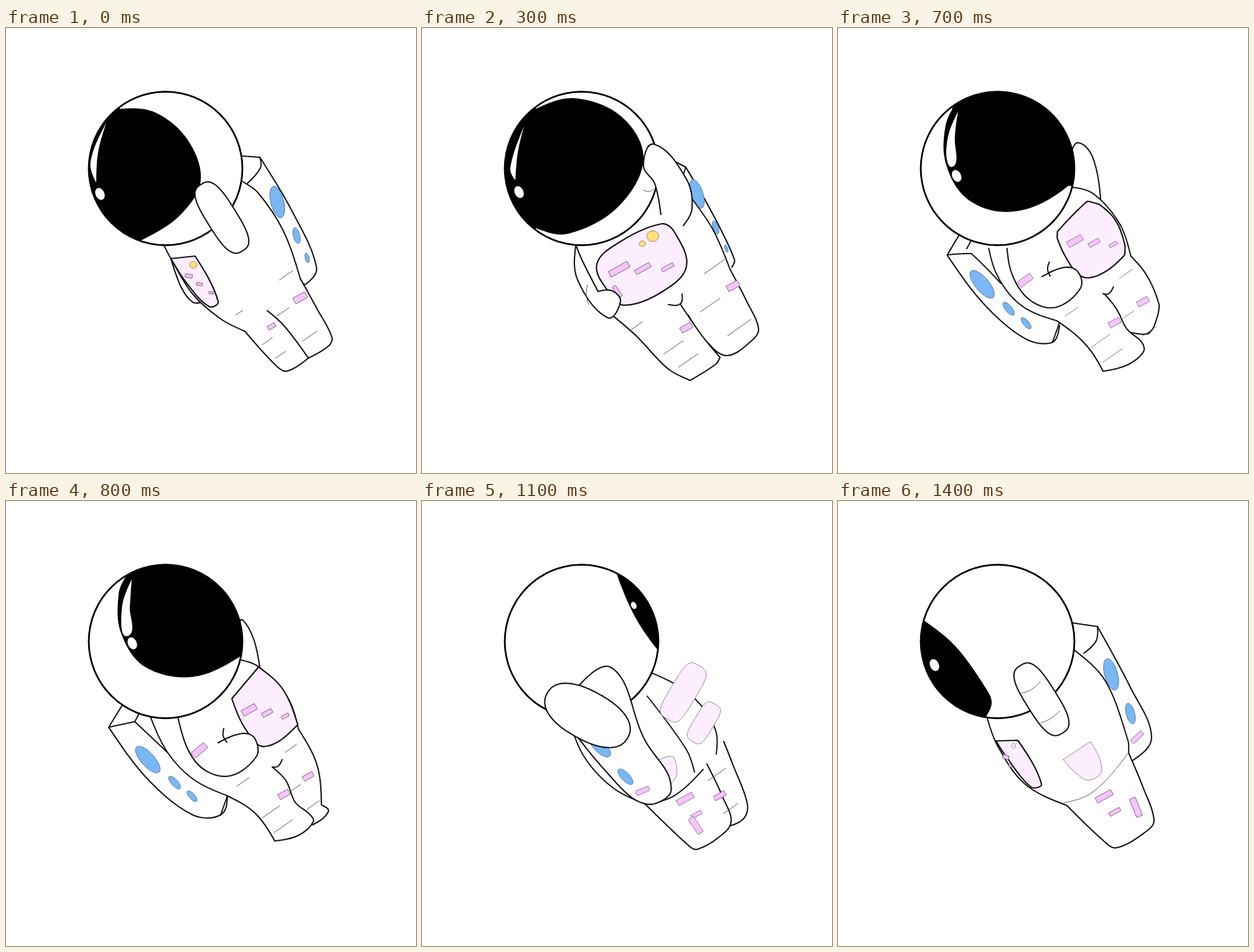
Recreate the animation shown at these times as an HTML page. Size 659 by 716 pixels, loop 1.5 s.

```html
<!DOCTYPE html>
<html lang="en">
<head>
<meta charset="utf-8">
<title>Turning astronaut</title>
<style>
html, body { margin: 0; width: 100%; height: 100%; overflow: hidden; background: #fff; }
svg { display: block; width: 100%; height: 100%; }
path { stroke-linejoin: round; stroke-linecap: round; }
.skin, .glint { fill: #fff; }
.limb { fill: #fff; stroke: #111; stroke-width: 2.1; }
.edge { fill: none; stroke: #111; stroke-width: 2; }
.fold { fill: none; stroke: #555; stroke-width: 1; }
.panel { fill: #fcedff; stroke: #111; stroke-width: 2.2; }
.patch { fill: #fcedff; stroke: #8d858f; stroke-width: 1; }
.bar { fill: #f4c6fc; stroke: #7c5c84; stroke-width: 1; }
.blue { fill: #79b7f5; stroke: #55708a; stroke-width: 1; }
.sun { fill: #ffe079; stroke: #8a7a58; stroke-width: 1; }
.visor { fill: #000; }
.visor, .glint { clip-path: url(#helmet); }
.rim { fill: none; stroke: #000; stroke-width: 2.8; }
</style>
</head>
<body>
<svg viewBox="0 0 659 716">
  <defs><clipPath id="helmet"><circle cx="256.5" cy="226" r="123.5"/></clipPath></defs>
  <g id="figure"></g>
</svg>
<script>
const STEP = 100, STEPS = 15, SAMPLES = 120;
const HEAD = { x: 256.5, y: 226, r: 123.5 };
const poses = [];
let parts;

const range = (n, f) => Array.from({ length: n }, (_, i) => f(i));
const xy = p => p.x.toFixed(1) + ' ' + p.y.toFixed(1);
const polygon = pts => 'M' + pts.map(xy).join('L') + 'Z';

// "x,y" points joined by a smooth curve; a star marks a corner
function curve(text, closed) {
  const p = text.split(' ').map(s => {
    const [x, y] = s.split(',').map(parseFloat);
    return { x, y, corner: s.endsWith('*') };
  });
  const n = p.length;
  if (!closed) p[0].corner = p[n - 1].corner = true;
  const handle = (i, reach) => {
    if (p[i].corner) return null;
    const a = p[(i + n - 1) % n], b = p[(i + 1) % n];
    const k = reach / 3 / Math.hypot(b.x - a.x, b.y - a.y);
    return { x: p[i].x + (b.x - a.x) * k, y: p[i].y + (b.y - a.y) * k };
  };
  const mid = (a, b) => ({ x: (a.x + b.x) / 2, y: (a.y + b.y) / 2 });
  let d = 'M' + xy(p[0]);
  for (let i = 0; i < (closed ? n : n - 1); i++) {
    const j = (i + 1) % n, a = p[i], b = p[j];
    const len = Math.hypot(b.x - a.x, b.y - a.y);
    const h = handle(i, len), g = handle(j, -len);
    d += h || g ? `C${xy(h || mid(a, g))} ${xy(g || mid(b, h))} ${xy(b)}` : 'L' + xy(b);
  }
  return closed ? d + 'Z' : d;
}

const turned = (cx, cy, deg) => {
  const c = Math.cos(deg * Math.PI / 180), s = Math.sin(deg * Math.PI / 180);
  return (u, v) => ({ x: cx + u * c - v * s, y: cy + u * s + v * c });
};

// superellipse: power 2 is an ellipse, higher is boxier
function blob(cx, cy, rx, ry, deg = 0, power = 2) {
  const at = turned(cx, cy, deg);
  const bend = v => Math.sign(v) * Math.abs(v) ** (2 / power);
  return polygon(range(64, i => {
    const a = i * Math.PI / 32;
    return at(rx * bend(Math.cos(a)), ry * bend(Math.sin(a)));
  }));
}

function rect(cx, cy, w, h, deg) {
  const at = turned(cx, cy, deg);
  return polygon([at(-w / 2, -h / 2), at(w / 2, -h / 2), at(w / 2, h / 2), at(-w / 2, h / 2)]);
}

const add = (name, style, d) => parts.push({ name, style, d });
const pose = step => poses.push({ step, parts: parts = [] });
const limb = (name, text) => add(name, 'limb', curve(text));
const edge = (name, text, style = 'edge') => add(name, style, curve(text));
const panel = text => add('panel', 'panel', curve(text, true));
const patch = text => add('patch', 'patch', curve(text, true));
const capsule = (name, style, ...box) => add(name, style, blob(...box));

const folds = (...list) => list.forEach(([x, y, len], i) => {
  const at = turned(x, y, -35);
  add('fold' + i, 'fold', `M${xy(at(-len / 2, 0))}L${xy(at(len / 2, 0))}`);
});
const blues = (deg, ...list) => list.forEach(([x, y, r], i) =>
  add('blue' + i, 'blue', blob(x, y, r * .4, r, deg)));
const suns = (...list) => list.forEach(([x, y, r], i) => add('sun' + i, 'sun', blob(x, y, r, r * .9)));
const bars = (name, ratio, ...list) => list.forEach(([x, y, w, deg = -29], i) =>
  add(name + i, 'bar', rect(x, y, w, w * ratio, deg)));

function body(left, right) {
  const pin = s => s.replace(' ', '* ') + '*';
  add('trunk', 'skin', curve(pin(left) + ' ' + pin(right), true));
  edge('left', left);
  edge('right', right);
}

function head(inside) {
  const ball = blob(HEAD.x, HEAD.y, HEAD.r, HEAD.r);
  add('ball', 'skin', ball);
  inside();
  add('rim', 'rim', ball);
}

// Only the inner edge is given; the rest runs clockwise outside the helmet
function visor(text, name = 'visor', dx = 0) {
  const angle = s => {
    const [x, y] = s.split(',').map(parseFloat);
    return Math.atan2(y - HEAD.y, x - HEAD.x);
  };
  const edgePts = text.split(' ');
  const from = angle(edgePts.at(-1));
  const span = (angle(edgePts[0]) - from + 2 * Math.PI) % (2 * Math.PI);
  const arc = range(7, i => {
    const a = from + span * i / 6;
    return `${HEAD.x + 175 * Math.cos(a)},${HEAD.y + 175 * Math.sin(a)}`;
  });
  edgePts[0] += '*';
  edgePts.push(edgePts.pop() + '*');
  const all = [...edgePts, ...arc].map(s => {
    const [x, y] = s.split(',');
    return `${+x + dx},${y}`;
  });
  add(name, 'visor', curve(all.join(' '), true));
}
const glint = text => add('glint', 'glint', curve(text, true));
const dot = (x, y, r = 10, name = 'dot') => add(name, 'glint', blob(x, y, r * .7, r, -25));

const rightVisor = '382,248 350,258* 300,188 264,102';
const leftVisor = '133,230 170,263 202,303 208,335';

// facing left
pose(0);
limb('packR', '380,206 408,208* 460,295 499,385 482,412 473,404');
edge('crease', '408,208 409,225 388,250');
blues(-14, [436, 280, 26], [467, 334, 13], [484, 370, 8]);
limb('arm2', '265,371 282,418 300,441 316,441');
limb('legR', '486,531 518,512 524,498 500,452 473,403');
limb('legL', '384,488 436,545 452,552 486,531* 445,477 410,447');
body('254,350 265,371 300,428 345,468 384,488', '473,403 445,325 405,265 380,247');
panel('265,371* 304,367* 341,440 326,448 290,410');
suns([301, 381, 6]);
bars('cell', .5, [294, 399, 11, 10], [311, 412, 9, 10], [330, 426, 7, 10]);
bars('leg', .5, [473, 434, 21], [427, 480, 13]);
folds([450, 398, 26], [445, 457, 24], [488, 496, 28], [375, 458, 14], [420, 504, 20], [441, 526, 20]);
head(() => {
  visor('183,130 240,136 292,180 313,245 280,301 217,342');
  glint('161,153* 136,215 145,249* 148,200');
  dot(151, 267);
});
capsule('arm1', 'limb', 347, 305, 63, 24, 58, 3);

// front, turned a little left
pose(3);
limb('packR', '403,213 424,224* 465,295 502,372 498,385');
edge('crease', '424,224 420,236');
blues(-18, [442, 267, 24], [472, 321, 11], [489, 355, 6]);
limb('legR', '428,462 458,505 490,527 530,503 541,484 522,440 495,388');
limb('legL', '307,463 345,496 395,548 431,567* 472,541 479,530* 450,495 415,444');
body('247,350 255,400 285,445 307,463', '495,388 468,325 434,275');
edge('crotch', '396,445 415,444 418,428');
panel('281,380 320,343 385,315 405,327 425,384 385,425 325,446 300,425');
suns([371, 335, 9.5], [354, 347, 5]);
bars('cell', .3, [317, 388, 34], [355, 387, 26], [395, 385, 20], [314, 424, 20, 55]);
bars('leg', .5, [500, 415, 20], [425, 482, 19]);
folds([470, 384, 40], [463, 446, 38], [510, 482, 46], [344, 480, 26], [404, 514, 38], [428, 535, 38]);
limb('arm2', '247,350 250,405 298,466 319,440 306,423 283,424* 258,375 248,351');
edge('crook', '266,413 264,430 268,445', 'fold');
head(() => {
  visor('183,130 245,113 320,142 356,210 315,288 235,331 183,322');
  glint('164,158* 142,225 150,245* 154,200');
  dot(156, 264);
});
limb('arm1', '384,300 374,250 356,222 373,187 425,243 434,290 420,318');
edge('wrist', '356,261 365,263 372,259', 'fold');

// front, turned a little right
pose(5);
limb('arm1', '393,258 390,229 378,195 407,169 439,198 452,310');
edge('wrist', '395,223 412,217 430,219', 'fold');
limb('pack', '210,343 196,368* 265,455 338,509 356,490');
edge('seam', '196,367 230,380 266,423');
blues(-36, [239, 405, 29], [281, 449, 13], [309, 475, 12]);
limb('legR', '430,429 460,473 497,511 530,490 544,468* 512,400 472,367');
limb('legL', '345,465 378,506 400,535 414,563* 468,544 492,520 488,504 460,483 430,429');
body('263,370 262,405 290,450 345,465', '472,367 450,308 415,264 376,258');
edge('crotch', '421,426 430,429 440,418');
panel('323,356* 365,317 413,291* 445,318 456,362* 415,401 362,417 338,388');
suns([401, 314, 9], [389, 329, 5]);
bars('cell', .32, [361, 356, 29], [395, 355, 22], [429, 353, 16], [366, 396, 23, 55]);
bars('leg', .45, [499, 435, 24], [440, 478, 22]);
folds([473, 390, 32], [470, 460, 20], [515, 485, 36], [365, 465, 30], [413, 511, 44], [433, 534, 42]);
limb('arm2', '263,370 262,405 290,450 328,464 365,430 345,407 302,422');
edge('thumb', '319,398 313,408 313,421');
edge('palm', '333,414 331,430 355,441', 'fold');
bars('sleeve', .5, [281, 416, 22]);
head(() => {
  visor('378,212 330,287 240,321 176,288 150,220 163,155 193,123');
  glint('175,150* 152,205 158,236 164,230 166,180');
  dot(166, 256);
});

// facing right
pose(8);
limb('arm1', '372,235 374,200 380,191 398,222 408,268');
limb('pack', '186,330 165,364* 230,450 300,505 345,505 356,474');
edge('seam', '165,364 207,355* 260,405');
edge('flap', '207,355 214,342');
edge('base', '356,474 345,505');
blues(-42, [228, 416, 27], [271, 453, 13], [299, 475, 11]);
limb('legR', '493,521 518,500 507,489* 500,425 470,367');
limb('legL', '355,474 400,502 432,547* 470,538 494,516 488,504 465,485 450,450 428,428');
body('232,347 260,405 300,447 355,474', '470,367 452,315 408,268 375,255');
edge('crotch', '428,428 437,427 444,416');
panel('363,318* 406,267* 445,303 469,360* 415,395 385,367');
bars('cell', .42, [391, 336, 24], [420, 341, 17], [449, 346, 12]);
bars('leg', .5, [486, 443, 17], [447, 472, 18]);
folds([458, 398, 22], [465, 462, 20], [494, 489, 24], [381, 452, 24], [426, 500, 34], [446, 523, 36]);
limb('arm2', '276,347 305,420 355,443 402,412 400,382 380,374 341,389');
edge('thumb', '350,366 349,378 355,388');
bars('sleeve', .42, [311, 401, 26, -40]);
head(() => {
  visor('380,248 300,283 222,266 184,210 181,150 192,122');
  glint('202,126* 186,175 196,217 199,170');
  dot(203, 229);
});

// back, turned right
pose(10);
add('pack', 'limb', curve('186,330 179,370* 250,450 325,514 363,497 300,420 256,300', true));
edge('seam', '179,370 205,373 228,362');
blues(-48, [243, 416, 26], [292, 467, 18]);
bars('tail', .33, [323, 490, 24]);
limb('legL', '355,485 425,552 441,560 480,538 503,514 490,475 467,417');
body('228,347 250,405 300,460 355,485', '467,417 474,375 440,303 381,252');
edge('belt', '355,485 410,469 468,415', 'fold');
panel('395,300* 410,274* 450,322 463,364 425,342');
suns([407, 307, 3.5], [417, 301, 2]);
bars('cell', .8, [431, 299, 9], [441, 310, 5]);
patch('357,419* 415,405* 416,436 390,454 366,438');
bars('tag', .35, [431, 472, 28], [449, 497, 18], [431, 527, 28, 50]);
limb('arm2', '317,334 345,388 395,415 440,375 415,353 404,364 414,363');
edge('cuff', '347,310 375,332 402,364');
head(() => {
  visor(rightVisor);
  visor(leftVisor, 'visor2', -110);
  glint('274,106* 285,147 298,153* 283,107*');
  dot(297, 168, 6);
});

// back, turned left
pose(13);
limb('legR', '485,525 516,512 523,488 500,425 485,387');
limb('legL', '363,490 439,563* 470,548 485,525 470,480 440,436');
body('262,390 300,447 363,490', '485,387 440,330 332,320');
edge('belt', '363,490 390,488 420,465');
patch('332,443* 380,417* 391,465 355,472');
bars('tag', .33, [407, 494, 28], [425, 519, 18], [458, 512, 31, 66]);
bars('leg', .42, [479, 474, 19]);
folds([474, 440, 34], [496, 495, 28]);
head(() => {
  visor(rightVisor, 'visor', 130);
  visor(leftVisor, 'visor2');
  dot(427, 168, 6);
  dot(155, 263, 10, 'dot2');
});
add('pack', 'limb', curve('330,320* 390,412 430,441 465,415 491,365 445,260 404,206 380,222', true));
edge('seam', '330,320 362,314* 390,265 415,215');
edge('side', '362,314 425,400 438,436');
capsule('pane0', 'patch', 420, 308, 50, 21, -59, 4);
capsule('pane1', 'patch', 453, 357, 35, 16, -59, 4);
blues(-33, [369, 348, 21], [397, 397, 13]);
bars('tail', .35, [418, 419, 20, -5]);
capsule('arm1', 'limb', 266, 345, 74, 39, 29, 2.3);

// facing away to the left
pose(14);
limb('packR', '376,196 417,202* 470,300 504,380 473,418');
edge('crease', '417,202 415,225 395,245');
blues(-15, [439, 279, 26], [470, 342, 17]);
bars('tail', .35, [481, 380, 22, -45]);
limb('legL', '368,490 425,545 447,558 495,532 508,514 490,460 467,405');
body('240,350 257,395 300,455 368,490', '467,405 466,385 430,290 380,240');
edge('belt', '362,486 410,468 467,405', 'fold');
panel('254,386* 289,385* 327,455 310,460 268,408');
bars('cell', .7, [270, 412, 9, 20], [277, 426, 5, 20]);
capsule('ring', 'patch', 282, 394, 3, 4);
patch('362,416* 406,387* 424,433 405,449 386,441');
bars('tag', .33, [428, 475, 28], [445, 500, 19], [479, 493, 31, 68]);
head(() => {
  visor('138,192 190,235 240,305 247,325 238,347');
  dot(155, 264);
});
capsule('arm1', 'limb', 327, 319, 64, 25, 58, 3);
edge('cuff', '291,310 310,304 325,291', 'fold');
edge('wrist', '326,357 342,350 356,338', 'fold');

const probe = document.createElementNS('http://www.w3.org/2000/svg', 'path');
const closed = d => d.endsWith('Z');
function sample(d) {
  probe.setAttribute('d', d);
  const gap = probe.getTotalLength() / (closed(d) ? SAMPLES : SAMPLES - 1);
  return range(SAMPLES, i => probe.getPointAtLength(gap * i));
}

// Offset along b that pairs two closed outlines with the least travel
function bestShift(a, b) {
  const cost = s => a.reduce((sum, p, i) => {
    const q = b[(i + s) % SAMPLES];
    return sum + (p.x - q.x) ** 2 + (p.y - q.y) ** 2;
  }, 0);
  const costs = range(SAMPLES, cost);
  return costs.indexOf(Math.min(...costs));
}

function blend(from, to, u) {
  const a = sample(from), b = sample(to);
  const s = closed(from) && closed(to) ? bestShift(a, b) : 0;
  const d = polygon(a.map((p, i) => {
    const q = b[(i + s) % SAMPLES];
    return { x: p.x + (q.x - p.x) * u, y: p.y + (q.y - p.y) * u };
  }));
  return closed(from) ? d : d.slice(0, -1);
}

function draw(step) {
  const k = poses.findLastIndex(p => p.step <= step);
  const a = poses[k], b = poses[k + 1] || a;
  const u = a === b ? 0 : (step - a.step) / (b.step - a.step);
  const [lead, other, v] = u < .3 ? [a, b, u] : [b, a, 1 - u];
  return lead.parts.map(({ name, style, d }) => {
    const twin = v && other.parts.find(p => p.name === name);
    return `<path class="${style}" d="${twin ? blend(d, twin.d, v) : d}"/>`;
  }).join('');
}

const figure = document.getElementById('figure');
const views = range(STEPS, draw);
let shown = -1;
function render(now) {
  const step = Math.floor(now / STEP) % STEPS;
  if (step !== shown) figure.innerHTML = views[shown = step];
}
function tick() {
  render(performance.now());
  requestAnimationFrame(tick);
}
tick();
</script>
</body>
</html>
```
